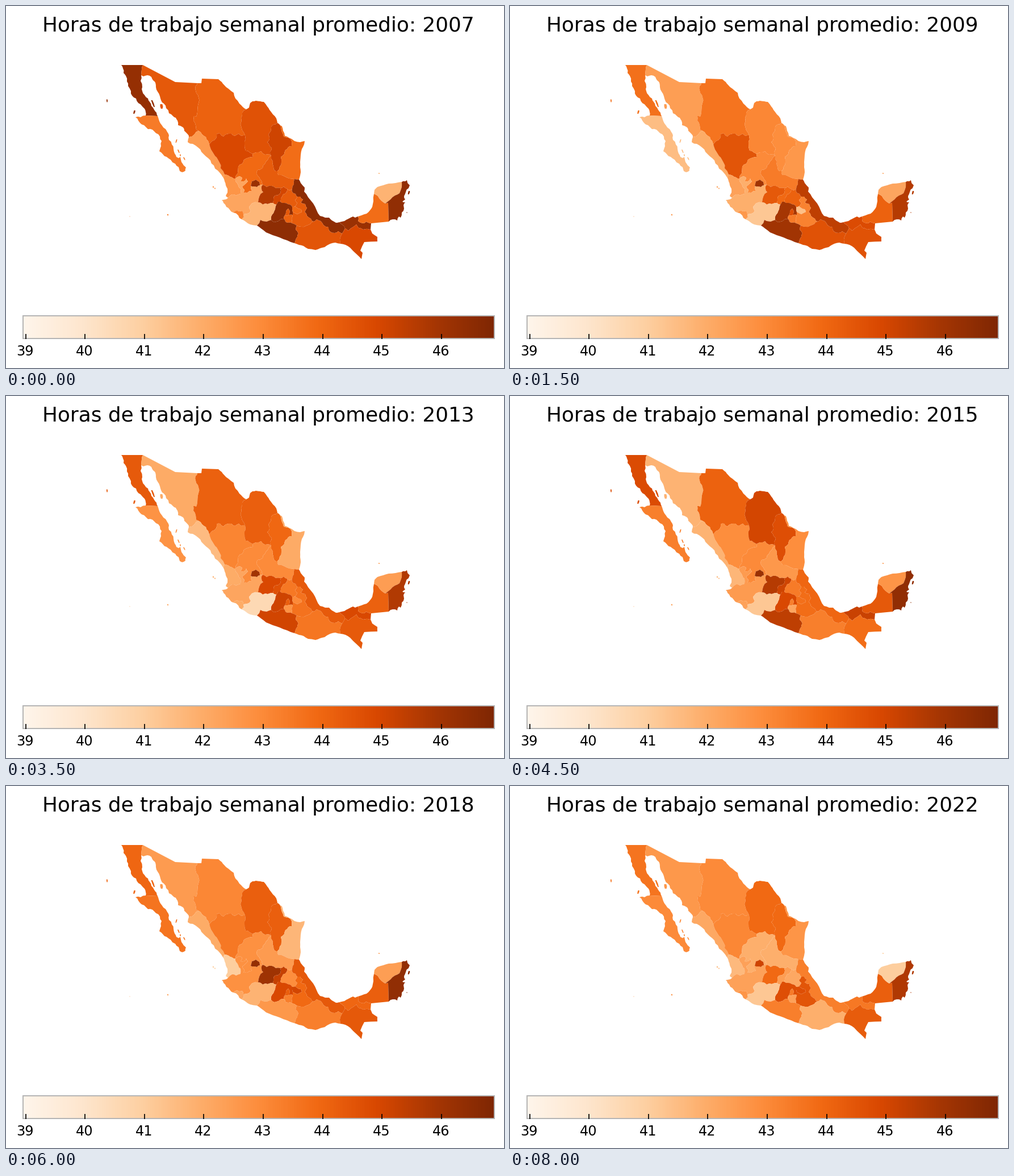
A matplotlib script that plays this animation: 877 by 638 pixels, repeating every 8.5 s.

```python
import random
import numpy as np
import matplotlib.pyplot as plt
from matplotlib.animation import FuncAnimation
from matplotlib.collections import PolyCollection
from matplotlib.patches import Rectangle

W, H, DPI = 877, 638, 128
PT = 72 / DPI                      # points per pixel
LEFT, RIGHT, TOP, BOTTOM = 29.5, 859.5, 545.5, 586
TICK0, UNIT = 34.5, 104.64         # x of 39 hours, pixels per hour
VMIN = 39 + (LEFT - TICK0) / UNIT
VMAX = 39 + (RIGHT - TICK0) / UNIT
KNOWN = [2007, 2009, 2011, 2015, 2018, 2020, 2022]
CMAP = plt.get_cmap("Oranges")

rng = random.Random(4)
arcs, polys, owner, hours = {}, [], [], []


def arc(name, *pts, rough=0.16):
    """Store a border line, adding a small kink to each longer segment."""
    out = [pts[0]]
    for (x0, y0), (x1, y1) in zip(pts, pts[1:]):
        if rough and np.hypot(x1 - x0, y1 - y0) > 5:
            k = rng.uniform(-rough, rough)
            out.append(((x0 + x1) / 2 - k * (y1 - y0),
                        (y0 + y1) / 2 + k * (x1 - x0)))
        out.append((x1, y1))
    arcs[name] = out


def gap(p, q):
    return np.hypot(p[0] - q[0], p[1] - q[1])


def ring(names):
    """Join arcs end to end, turning each one as needed."""
    lines = [arcs[n] for n in names.split()]
    path = list(lines[0])
    if len(lines) > 1:
        ends = lines[1][0], lines[1][-1]
        if min(gap(path[0], e) for e in ends) < min(gap(path[-1], e) for e in ends):
            path.reverse()
    for line in lines[1:]:
        if gap(line[0], path[-1]) > gap(line[-1], path[-1]):
            line = line[::-1]
        path += line[1:]
    return path


def state(names, values, *islands):
    for shape in [ring(names), *islands]:
        polys.append(shape)
        owner.append(len(hours))
    hours.append(values)


def islet(x, y, w, h, lean=0):
    return [(x - w / 2 - lean, y - h / 2), (x + w / 4 - lean, y - h / 2),
            (x + w / 2, y), (x + w / 3 + lean, y + h / 2),
            (x - w / 4 + lean, y + h / 2), (x - w / 2, y)]


# Outer borders and coasts
arc("bc_us", (203, 104), (241, 104), rough=0)
arc("bc_w", (203, 104), (206, 110), (207, 118), (211, 123), (213, 133), (215, 141),
    (220, 150), (222, 158), (229, 163), (233, 171), (240, 177), (244, 181), (246, 187), (246, 193))
arc("bc_e", (238, 122), (237, 132), (240, 143), (240, 150), (244, 157), (250, 163),
    (253, 169), (256, 176), (261, 183), (265, 188), (267, 194))
arc("bcs_w", (246, 193), (237, 196), (228, 196), (233, 202), (238, 208), (243, 210),
    (250, 217), (258, 218), (264, 224), (271, 230), (274, 238), (273, 247), (270, 256),
    (276, 261), (283, 266), (290, 271), (298, 278), (304, 284), (306, 291), (310, 293))
arc("bcs_e", (267, 194), (269, 200), (272, 207), (277, 214), (284, 222), (287, 228),
    (287, 236), (292, 244), (295, 252), (297, 260), (300, 266), (304, 268), (307, 266),
    (309, 275), (313, 281), (317, 285), (316, 290), (310, 293))
arc("son_us", (241, 104), (298, 134), (337, 136), rough=0)
arc("son_w", (238, 122), (242, 124), (249, 122), (256, 125), (259, 131), (263, 135),
    (264, 143), (267, 151), (271, 159), (273, 166), (278, 172), (282, 180), (287, 189),
    (294, 194), (299, 197), (302, 202), (303, 210), (312, 214), (314, 220), (320, 226), (322, 231))
arc("chh_us", (337, 136), (344, 136), (345, 128), (374, 129), rough=0)
arc("chh_n", (374, 129), (380, 134), (384, 139), (392, 146), (401, 153), (404, 163),
    (411, 172), (417, 178), (423, 182), rough=.06)
arc("coa_n", (423, 182), (428, 179), (430, 171), (434, 168), (440, 167), (448, 168),
    (454, 169), (460, 177), (464, 183), (470, 191), (476, 198), (478, 206), rough=.08)
arc("nle_n", (478, 206), (481, 208))
arc("tam_n", (481, 208), (486, 212), (488, 220), (491, 229), (498, 232), (508, 238),
    (518, 240), (526, 238), rough=.08)
arc("tam_e", (526, 238), (525, 244), (521, 252), (519, 262), (518, 275), (518, 284),
    (519, 293), (516, 306), rough=.03)
arc("ver_e", (516, 306), (519, 312), (526, 320), (525, 327), (532, 337), (541, 348),
    (547, 360), (553, 370), (562, 373), (569, 373), (574, 378), (581, 382), (587, 381), rough=.06)
arc("tab_n", (587, 381), (596, 379), (603, 375), (611, 371), (615, 373), (620, 371), rough=.06)
arc("cam_w", (620, 371), (626, 369), (635, 366), (641, 360), (645, 354), (647, 344), (648, 331), rough=.06)
arc("yuc_n", (648, 331), (649, 324), (654, 319), (664, 316), (674, 313), (686, 312), (697, 310), rough=.03)
arc("roo_e", (697, 310), (703, 309), (706, 307), (711, 316), (709, 321), (704, 328),
    (701, 335), (703, 341), (698, 345), (703, 346), (700, 351), (701, 357), (697, 364),
    (695, 373), (692, 371), (689, 378), (681, 376), (674, 380))
arc("cam_s", (643, 383), (674, 380), rough=0)
arc("tab_s", (643, 383), (642, 394), rough=0)
arc("chp_s", (642, 394), (645, 401), (654, 407), (654, 415), (631, 416), (624, 431),
    (628, 435), (626, 446), rough=.03)
arc("chp_w", (626, 446), (617, 437), (606, 426), (598, 421), (589, 419), rough=.04)
arc("oax_w", (589, 419), (580, 417), (571, 419), (561, 425), (553, 427), (545, 430),
    (532, 428), (524, 423), (516, 421), (508, 418), rough=.04)
arc("gro_w", (508, 418), (495, 413), (482, 408), (470, 404), (458, 399), (449, 392), (442, 387), rough=.04)
arc("mic_w", (442, 387), (430, 385), (422, 380), (415, 376), rough=.05)
arc("col_w", (415, 376), (409, 369), (400, 364))
arc("jal_w", (400, 364), (394, 359), (388, 354), (383, 347), (380, 342), (386, 341), (391, 338))
arc("nay_w", (391, 338), (387, 335), (390, 329), (390, 322), (387, 316), (385, 309), (383, 303), rough=.08)
arc("sin_w", (383, 303), (379, 297), (373, 290), (366, 281), (360, 272), (352, 265), (344, 257),
    (339, 250), (329, 243), (320, 240), (322, 231))

# Shared borders
arc("bc_son", (241, 104), (239, 112), (238, 122))
arc("bc_bcs", (246, 193), (267, 194), rough=0)
arc("son_chh", (337, 136), (334, 141), (334, 149), (338, 157), (338, 175), (337, 187),
    (335, 195), (330, 194), (330, 202), (334, 210), (335, 218), (339, 220))
arc("son_sin", (339, 220), (332, 226), (322, 231))
arc("chh_sin", (339, 220), (345, 226), (352, 231), (356, 238), (358, 244))
arc("chh_dur", (358, 244), (363, 238), (370, 233), (371, 226), (377, 225), (383, 230),
    (388, 226), (397, 225), (403, 229), (410, 225), (415, 229), (421, 228))
arc("chh_coa", (423, 182), (416, 188), (414, 197), (413, 208), (416, 219), (421, 228))
arc("dur_coa", (421, 228), (422, 235), (420, 243), (422, 255), (429, 258), (434, 261))
arc("sin_dur", (358, 244), (361, 253), (366, 261), (371, 267), (376, 276), (378, 286), (385, 297))
arc("sin_nay", (385, 297), (383, 303))
arc("dur_nay", (385, 297), (392, 299), (398, 302), (404, 304))
arc("dur_zac", (434, 261), (435, 266), (425, 268), (419, 271), (416, 278), (409, 283), (408, 295), (404, 304))
arc("coa_zac", (434, 261), (441, 258), (449, 256), (456, 262), (462, 261), (467, 264))
arc("coa_nle", (478, 206), (471, 209), (467, 213), (466, 221), (462, 227), (464, 234),
    (460, 240), (464, 246), (468, 250), (465, 257), (467, 264))
arc("nle_tam", (481, 208), (484, 213), (486, 222), (489, 230), (497, 232), (503, 238),
    (503, 247), (497, 249), (492, 254), (490, 261), (484, 266), (485, 275), (482, 283), (478, 291))
arc("nle_slp", (467, 264), (470, 274), (471, 283), (473, 290), (478, 291))
arc("tam_slp", (478, 291), (480, 298), (490, 300), (499, 304), (508, 305))
arc("tam_ver", (508, 305), (516, 306))
arc("zac_slp", (467, 264), (461, 271), (456, 278), (452, 285), (443, 289), (441, 295),
    (446, 302), (450, 308), (452, 315))
arc("nay_jal", (404, 304), (405, 310), (409, 316), (413, 322), (413, 331), (405, 334), (398, 332), (391, 338))
arc("zac_jal", (404, 304), (411, 300), (416, 303), (413, 309), (419, 309), (423, 304), (426, 309),
    (421, 314), (416, 318), (420, 324), (418, 329), (425, 329), (433, 326), (431, 317))
arc("zac_agu", (431, 317), (433, 309), (440, 306), (446, 310), (447, 316))
arc("jal_agu", (447, 316), (442, 319), (436, 318), (431, 317))
arc("zac_jal2", (447, 316), (452, 315))
arc("jal_gua", (452, 315), (450, 322), (453, 328), (446, 336), (444, 346))
arc("slp_gua", (452, 315), (459, 319), (468, 317), (475, 321), (483, 321))
arc("slp_que", (483, 321), (489, 318), (495, 322))
arc("slp_hid", (495, 322), (500, 325), (504, 322))
arc("slp_ver", (504, 322), (507, 314), (508, 305))
arc("jal_col", (400, 364), (407, 360), (412, 362), (416, 361), (418, 367))
arc("col_mic", (418, 367), (419, 372), (415, 376))
arc("jal_mic", (418, 367), (425, 366), (431, 361), (428, 354), (433, 348), (444, 346))
arc("gua_mic", (444, 346), (452, 350), (461, 349), (470, 347))
arc("gua_que", (483, 321), (483, 330), (474, 334), (471, 340), (470, 347))
arc("que_mic", (470, 347), (476, 350))
arc("que_mex", (476, 350), (479, 345), (483, 345))
arc("que_hid", (483, 345), (484, 339), (488, 332), (494, 328), (495, 322))
arc("mic_mex", (476, 350), (474, 358), (471, 365), (467, 371), (467, 377))
arc("mic_gro", (467, 377), (459, 380), (452, 379), (448, 377), (442, 387))
arc("mex_gro", (467, 377), (473, 381), (480, 379), (489, 375))
arc("mex_mor", (489, 375), (491, 369))
arc("mex_cmx", (491, 369), (493, 362), (497, 357), (500, 362), (499, 368))
arc("cmx_mor", (491, 369), (499, 368))
arc("mex_mor2", (499, 368), (505, 368))
arc("mor_pue", (505, 368), (503, 375), (504, 383))
arc("mor_gro", (489, 375), (492, 380), (497, 382), (504, 383))
arc("mex_hid", (483, 345), (490, 347), (496, 349), (500, 350), (504, 354))
arc("mex_tla", (504, 354), (504, 359), (505, 363))
arc("mex_pue", (505, 363), (505, 368))
arc("hid_tla", (504, 354), (509, 353))
arc("tla_pue", (509, 353), (513, 356), (519, 358), (521, 363), (513, 367), (505, 363))
arc("hid_pue", (509, 353), (513, 347), (509, 342), (513, 336))
arc("hid_ver", (504, 322), (505, 329), (510, 331), (513, 336))
arc("ver_pue", (513, 336), (518, 336), (523, 341), (519, 346), (527, 349), (530, 356),
    (526, 363), (530, 370), (537, 375), (541, 380))
arc("pue_gro", (504, 383), (512, 387))
arc("pue_oax", (512, 387), (520, 389), (529, 387), (536, 384), (541, 380))
arc("gro_oax", (512, 387), (510, 394), (515, 401), (513, 407), (510, 412), (508, 418))
arc("ver_oax", (541, 380), (547, 376), (554, 379), (559, 386), (568, 390), (570, 397),
    (579, 400), (585, 397), (592, 401))
arc("oax_chp", (592, 401), (588, 411), (589, 419))
arc("ver_chp", (592, 401), (597, 392))
arc("ver_tab", (597, 392), (593, 386), (587, 381))
arc("tab_chp", (597, 392), (602, 396), (607, 392), (612, 389), (617, 385), (621, 391), (629, 394), (642, 394))
arc("tab_cam", (620, 371), (620, 379), (629, 383), (634, 380), (643, 383))
arc("cam_yuc", (648, 331), (655, 335), (661, 343), (668, 348), rough=.06)
arc("cam_roo", (668, 348), (673, 347), (674, 380), rough=0)
arc("yuc_roo", (668, 348), (677, 341), (685, 334), (693, 330), (697, 319), (697, 310), rough=.06)

# Weekly hours in the known years
state("bc_us bc_son bc_e bc_bcs bc_w", [46.3, 43.7, 43.9, 44.8, 44.0, 43.1, 43.6],
      islet(178, 167, 2, 5), islet(226, 187, 3, 6, -1), islet(259, 172, 3, 12, 2))
state("bc_bcs bcs_e bcs_w", [43.4, 41.5, 42.2, 43.3, 43.6, 40.0, 43.0],
      islet(300, 238, 2, 6, -1), islet(304, 256, 2, 6, 1), islet(307, 263, 2, 3), islet(314, 269, 2, 5, 1))
state("son_us son_chh son_sin son_w bc_son", [44.4, 42.4, 42.3, 41.8, 42.5, 41.2, 42.6],
      islet(274, 177, 5, 8))
state("chh_us chh_n chh_coa chh_dur chh_sin son_chh", [44.1, 43.6, 44.2, 44.1, 43.1, 42.9, 43.0])
state("son_sin chh_sin sin_dur sin_nay sin_w", [42.5, 42.0, 41.3, 41.8, 42.0, 40.6, 42.1])
state("chh_dur dur_coa dur_zac dur_nay sin_dur", [44.9, 44.5, 43.4, 42.9, 43.5, 42.0, 43.1])
state("coa_n coa_nle coa_zac dur_coa chh_coa", [44.6, 43.1, 43.4, 45.0, 44.2, 43.0, 43.9])
state("nle_n nle_tam nle_slp coa_nle", [45.1, 42.9, 43.2, 44.7, 44.2, 43.5, 43.9])
state("tam_n tam_e tam_ver tam_slp nle_tam", [43.8, 42.6, 41.2, 42.9, 41.7, 40.3, 42.7])
state("coa_zac zac_slp zac_jal2 zac_agu zac_jal dur_zac", [43.9, 43.0, 42.9, 43.0, 42.8, 41.0, 41.9])
state("nle_slp tam_slp slp_ver slp_hid slp_que slp_gua zac_slp", [44.3, 43.4, 43.3, 42.6, 42.5, 41.0, 41.9])
state("dur_nay nay_jal nay_w sin_nay", [42.7, 42.3, 42.3, 41.7, 41.0, 40.2, 41.6],
      islet(365, 319, 2, 3), islet(368, 321.5, 2, 2))
state("zac_jal jal_agu zac_jal2 jal_gua jal_mic jal_col jal_w nay_jal",
      [42.2, 41.9, 41.9, 42.5, 42.8, 42.5, 42.3])
state("zac_agu jal_agu", [46.2, 46.0, 45.8, 46.2, 46.3, 46.0, 45.1])
state("slp_gua gua_que gua_mic jal_gua", [45.6, 44.4, 44.2, 45.6, 46.1, 42.0, 43.9])
state("slp_que que_hid que_mex que_mic gua_que", [45.0, 43.9, 44.2, 45.1, 45.3, 42.1, 42.4])
state("slp_hid hid_ver hid_pue hid_tla mex_hid que_hid", [44.3, 44.1, 43.6, 43.4, 42.9, 39.1, 42.1])
state("tam_ver ver_e ver_tab ver_chp ver_oax ver_pue hid_ver slp_ver",
      [46.5, 45.4, 44.7, 44.0, 44.4, 42.3, 43.3])
state("que_mex mex_hid mex_tla mex_pue mex_mor2 mex_cmx mex_mor mex_gro mic_mex",
      [46.4, 45.9, 45.3, 44.9, 44.9, 42.2, 44.7])
state("mex_cmx cmx_mor", [44.4, 44.7, 45.1, 43.3, 44.2, 41.3, 43.4])
state("cmx_mor mex_mor2 mor_pue mor_gro mex_mor", [44.1, 43.4, 43.3, 42.2, 43.3, 40.8, 42.3])
state("hid_tla tla_pue mex_tla", [43.9, 41.4, 42.3, 43.7, 45.0, 42.0, 44.7])
state("ver_pue pue_oax pue_gro mor_pue mex_pue tla_pue hid_pue", [44.3, 43.2, 43.5, 43.8, 43.9, 41.5, 44.5])
state("gua_mic que_mic mic_mex mic_gro mic_w col_mic jal_mic", [41.7, 41.2, 39.9, 41.2, 41.8, 40.4, 41.2])
state("jal_col col_mic col_w", [43.2, 42.6, 41.7, 42.3, 42.2, 40.6, 42.7],
      islet(285, 368, 2.4, 2.4), islet(218, 371, 1, 1))
state("mic_gro mex_gro mor_gro pue_gro gro_oax gro_w", [46.5, 46.0, 44.7, 45.4, 42.6, 43.5, 43.3])
state("pue_oax ver_oax oax_chp oax_w gro_oax", [44.5, 44.6, 43.8, 43.3, 43.3, 41.4, 41.9])
state("tab_n tab_cam tab_s tab_chp ver_tab", [46.2, 44.8, 44.6, 45.2, 44.0, 40.6, 43.5])
state("tab_chp chp_s chp_w oax_chp ver_chp", [44.9, 44.6, 44.9, 43.8, 44.4, 44.4, 44.3])
state("cam_w cam_yuc cam_roo cam_s tab_cam", [43.8, 44.1, 43.9, 44.4, 44.2, 43.2, 44.2])
state("yuc_n yuc_roo cam_yuc", [41.8, 42.2, 42.2, 42.7, 42.4, 39.2, 41.0], islet(657, 295, 2, 2))
state("yuc_roo roo_e cam_roo", [46.4, 45.6, 44.9, 46.4, 46.4, 41.0, 45.7],
      islet(709.5, 329, 3, 6, -1), islet(706, 364, 1, 2))

fig = plt.figure(figsize=(W / DPI, H / DPI), dpi=DPI, facecolor="white")
ax = fig.add_axes([0, 0, 1, 1])
ax.axis("off")

ax.imshow(np.linspace(0, 1, 256)[None, :], cmap=CMAP, aspect="auto",
          interpolation="nearest", extent=(LEFT, RIGHT, BOTTOM, TOP))
ax.add_patch(Rectangle((LEFT, TOP), RIGHT - LEFT, BOTTOM - TOP, fill=False,
                       ec="#b5b5b5", lw=2 * PT, zorder=3))
for n in range(8):
    x = TICK0 + n * UNIT
    ax.plot([x, x], [577.5, 586.5], color="black", lw=1.7 * PT,
            solid_capstyle="butt", zorder=4)
    ax.text(x - 1, 615.5, str(39 + n), fontsize=24 * PT, ha="center",
            va="baseline", family="DejaVu Sans")

title = ax.text(444.5, 45.5, "", fontsize=35.9 * PT, ha="center",
                va="baseline", family="DejaVu Sans")
country = PolyCollection(polys, linewidths=0, zorder=2)
ax.add_collection(country)
ax.set_xlim(0, W)
ax.set_ylim(H, 0)


def draw(k):
    year = 2007 + max(0, k - 1)    # the first year stays twice as long
    now = np.array([np.interp(year, KNOWN, h) for h in hours])
    country.set_facecolor(CMAP((now[owner] - VMIN) / (VMAX - VMIN)))
    title.set_text(f"Horas de trabajo semanal promedio: {year}")
    return country, title


anim = FuncAnimation(fig, draw, frames=17, init_func=lambda: draw(0),
                     interval=500, repeat=True, repeat_delay=0)
plt.show()
```
